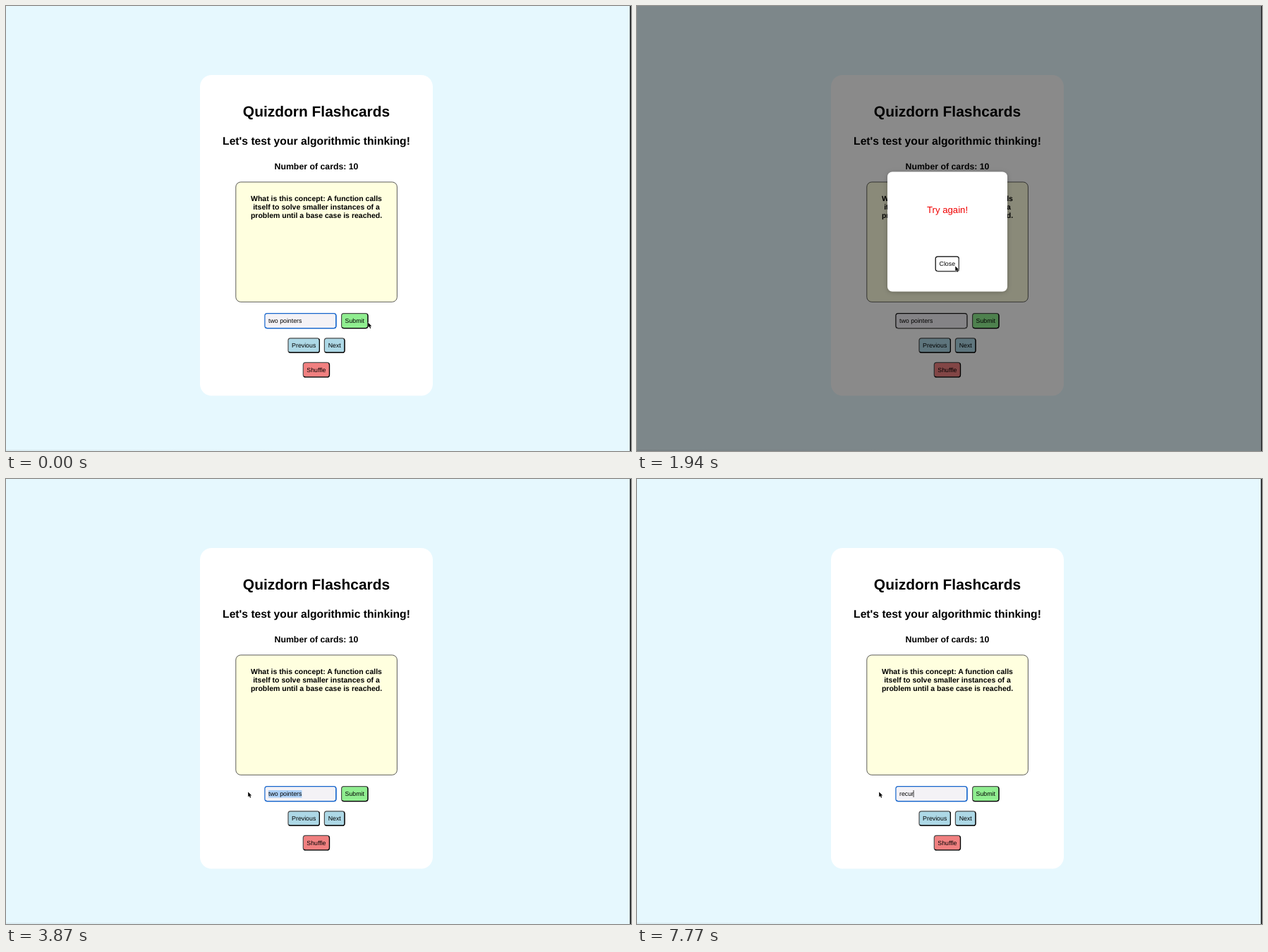
An HTML page that plays this animation: 886 by 632 pixels, repeating every 8 s.

```html
<!DOCTYPE html>
<html lang="en">
<head>
<meta charset="utf-8">
<title>Flashcards</title>
<style>
  html, body { margin: 0; width: 886px; height: 632px; overflow: hidden; background: #e6f8fe; }
  svg { display: block; font-family: "Liberation Sans", Arial, Helvetica, sans-serif; text-rendering: geometricPrecision; }
</style>
</head>
<body>
<svg id="stage" width="886" height="632" viewBox="0 0 886 632">
  <defs>
    <linearGradient id="edge">
      <stop offset="0" stop-color="#000" stop-opacity=".05"/>
      <stop offset="1" stop-color="#000" stop-opacity="0"/>
    </linearGradient>
    <filter id="shadow" x="-10%" y="-10%" width="120%" height="120%">
      <feDropShadow dx="0" dy="1" stdDeviation="3" flood-opacity=".25"/>
    </filter>
  </defs>
  <rect width="886" height="632" fill="#e6f8fe"/>
  <rect y="630" width="430" height="2" fill="url(#edge)"/>
  <g id="page"></g>
  <g id="modal">
    <rect width="884" height="632" opacity=".46"/>
    <rect x="355" y="235.5" width="170" height="170" rx="7" fill="#fff" filter="url(#shadow)"/>
  </g>
  <rect x="884" width="1" height="632" fill="#6c7274"/>
  <rect x="885" width="1" height="632" fill="#16181a"/>
  <path id="arrow" d="M0 0v7l1.6-1.5 1.2 2.8 1.2-.5-1.2-2.7h2.2z" stroke="#fff" stroke-width=".7" paint-order="stroke"/>
  <path id="beam" d="M-2-5.5q2 0 2 1v9q0 1-2 1M2-5.5q-2 0-2 1M0 4.5q0 1 2 1" fill="none" stroke="#222" stroke-width=".8"/>
</svg>
<script>
const page = document.getElementById('page');
const modal = document.getElementById('modal');
const arrow = document.getElementById('arrow');
const beam = document.getElementById('beam');
const LOOP = 8000, FONT = 8.8, TEXT_LEFT = 372;
const field = { x: 366.9, y: 436.6, w: 101, h: 21 };

function add(parent, tag, attrs, content = '') {
  const node = document.createElementNS('http://www.w3.org/2000/svg', tag);
  for (const key in attrs) node.setAttribute(key, attrs[key]);
  node.textContent = content;
  parent.append(node);
  return node;
}

const set = (node, attrs) => { for (const key in attrs) node.setAttribute(key, attrs[key]); };
const show = (node, on) => set(node, { visibility: on ? 'visible' : 'hidden' });

function label(parent, content, x, y, size, extra = {}) {
  return add(parent, 'text', { x, y, 'font-size': size, 'text-anchor': 'middle', ...extra }, content);
}

// Rounded box whose top-left and bottom-right borders can differ.
function bevel(parent, x, y, w, h, fill, light, dark) {
  const r = 3.3;
  const box = add(parent, 'rect', { x, y, width: w, height: h, rx: r, fill, stroke: light, 'stroke-width': 1.2 });
  const side = add(parent, 'path', {
    d: `M${x + w - 1} ${y + 1}Q${x + w} ${y + 2} ${x + w} ${y + r}V${y + h - r}q0 ${r} ${-r} ${r}H${x + r}q-1.3 0-2.3-1`,
    fill: 'none', stroke: dark, 'stroke-width': 1.2
  });
  return { box, side };
}

function button(parent, content, x, y, w, h, fill) {
  const { box, side } = bevel(parent, x, y, w, h, fill, '#4c4c4c', '#000');
  label(parent, content, x + w / 2, y + h / 2 + 2.8, FONT);
  return (pressed, color = fill) => {
    set(box, { fill: pressed ? '#fff' : color, stroke: pressed ? '#000' : '#4c4c4c' });
    set(side, { stroke: pressed ? '#4c4c4c' : '#000' });
  };
}

const bold = { 'font-weight': 700 };
add(page, 'rect', { x: 275, y: 98, width: 330, height: 455.5, rx: 16.5, fill: '#fff' });
label(page, 'Quizdorn Flashcards', 440, 157.3, 20.95, bold);
label(page, "Let's test your algorithmic thinking!", 440, 197, 15.68, bold);
label(page, 'Number of cards: 10', 440, 231.5, 12.3, bold);
add(page, 'rect', { x: 325.8, y: 250, width: 228.6, height: 170.3, rx: 7, fill: '#ffffdf', stroke: '#333', 'stroke-width': .8 });
['What is this concept: A function calls',
 'itself to solve smaller instances of a',
 'problem until a base case is reached.'
].forEach((line, i) => label(page, line, 440, 277 + i * 12, 10.5, bold));

const input = bevel(page, field.x, field.y, field.w, field.h, '#f4f2f6', '#111', '#666');
const selection = add(page, 'rect', { y: 442, height: 10.5, fill: '#abcff6' });
const answer = add(page, 'text', { x: TEXT_LEFT, y: 450, 'font-size': FONT });
const caret = add(page, 'rect', { y: 442, width: .8, height: 10, fill: '#111' });
const paintSubmit = button(page, 'Submit', 475.6, 436.6, 37.4, 21, '#90ee90');
button(page, 'Previous', 400, 471.8, 44.4, 20.4, '#add8e6');
button(page, 'Next', 451.4, 471.8, 28.6, 20.4, '#add8e6');
button(page, 'Shuffle', 421.3, 506.4, 37.2, 20.6, '#f08080');

label(modal, 'Try again!', 440, 294, 13.2, { fill: '#f00000' });
const paintClose = button(modal, 'Close', 423.2, 355.8, 33.2, 20.8, '#add8e6');

// [start ms, value...]; each row holds until the next one.
const pointer = [
  [0, 513.3, 449.6], [150, 510, 449], [300, 507.5, 448], [600, 504, 444],
  [750, 487, 423], [900, 465, 393], [1050, 452, 375], [1340, 451.7, 372], [1490, 451.3, 369.4],
  [2240, 451, 378], [2390, 449, 399], [2540, 447, 424], [2670, 446, 440],
  [2820, 445.5, 447], [2970, 445, 448.5], [3120, 431, 448.5], [3270, 404.8, 448.5],
  [3420, 369, 448.5], [3570, 342, 445.6], [3870, 343.2, 444.4]
];
const typed = [[0, 'two pointers'], [5970, 're'], [6720, 'rec'], [6870, 'recu'], [7170, 'recur']];
const caretOn = [[0, false], [2970, true], [3120, false], [5970, true], [6420, false], [6720, true], [7620, false], [7770, true]];

const at = (track, t) => track.findLast(row => row[0] <= t).slice(1);
const within = (v, from, to) => v >= from && v < to;

function render(t) {
  const [x, y] = at(pointer, t);
  const overField = within(x, field.x, field.x + field.w) && within(y, field.y, field.y + field.h);
  for (const cursor of [arrow, beam]) set(cursor, { transform: `translate(${x} ${y})` });
  show(arrow, !overField);
  show(beam, overField);

  show(modal, within(t, 450, 2090));
  paintSubmit(within(t, 300, 450), within(t, 150, 600) ? '#7fe07f' : '#90ee90');
  paintClose(within(t, 1940, 2090));

  const focused = t < 300 || t >= 2970;
  set(input.box, { stroke: focused ? '#1464cc' : '#111' });
  set(input.side, { stroke: focused ? '#1464cc' : '#666' });

  const [value] = at(typed, t);
  if (answer.textContent !== value) answer.textContent = value;
  const end = TEXT_LEFT + answer.getComputedTextLength();
  const start = Math.min(end, Math.max(TEXT_LEFT, x));
  show(selection, within(t, 3120, 5970));
  set(selection, { x: start, width: end - start });
  show(caret, at(caretOn, t)[0]);
  set(caret, { x: end - .4 });
}

const began = performance.now();
function tick() {
  render((performance.now() - began) % LOOP);
  requestAnimationFrame(tick);
}
tick();
</script>
</body>
</html>
```
